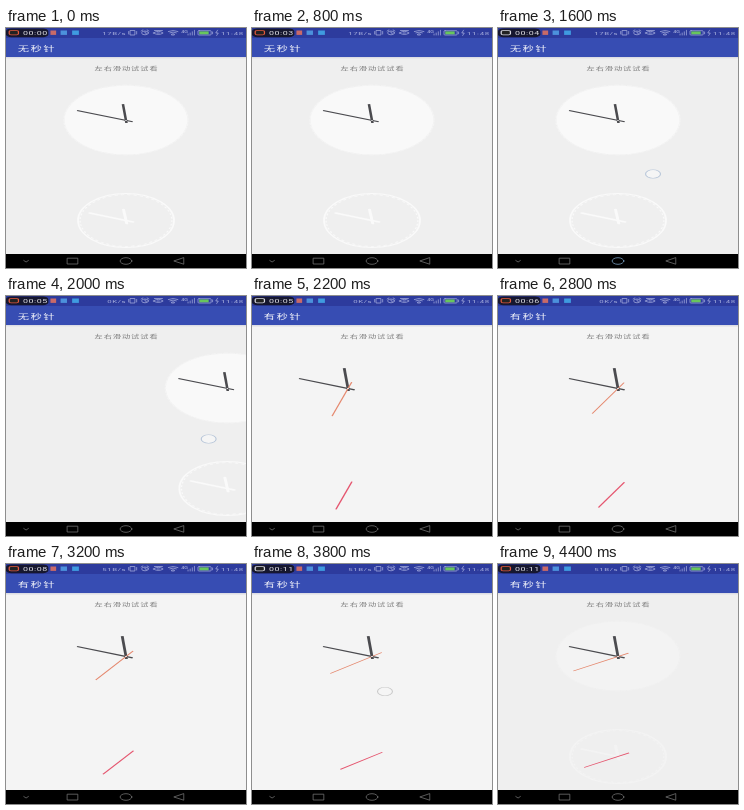
These frames come from a looping animation (240x240 px, 4600 ms). An HTML page:

```html
<!DOCTYPE html>
<html lang="zh">
<head>
<meta charset="utf-8">
<title>Clock pager</title>
<style>
  html, body { margin: 0; width: 100%; height: 100%; overflow: hidden; background: #efefef; }
  svg { display: block; width: 100vw; height: 100vh; }
  text { font-family: Roboto, "Noto Sans CJK SC", "Noto Sans CJK", sans-serif; }
  .line { fill: none; stroke-linecap: round; stroke-linejoin: round; }
  .status { stroke: #aeb6e2; stroke-width: .5; }
  .nav { stroke: #757575; stroke-width: .55; }
  .hands { stroke: #4b4b4f; stroke-linecap: butt; }
  .relief { stroke: #fafafa; }
</style>
</head>
<body>
<!-- A 9:16 phone screen squeezed into the stage -->
<svg viewBox="0 0 135 240" preserveAspectRatio="none">
  <rect id="page" width="135" height="240"/>

  <g id="plain">
    <g id="dials">
      <circle cx="67.5" cy="92" r="34.6" fill="#f9f9f9"/>
      <circle cx="67.5" cy="92" r="34.8" class="line" stroke="#f5f5f5" stroke-width=".8" stroke-dasharray="2 1.6"/>
      <g class="line relief" transform="translate(67.5 192.5)">
        <circle r="27" stroke-width="1"/>
        <circle r="25.8" stroke-width=".7" stroke-dasharray="1.2 2.4"/>
        <path d="M4 1.5 -20.5-7.5" stroke-width="1.4"/>
        <path d="M.4 3-1.4-11" stroke-width="1.7"/>
      </g>
    </g>
    <g id="plainHands" class="hands" transform="translate(67.5 92.5)">
      <path d="M0 2.5V-16.5" transform="rotate(354)" stroke-width="1.45"/>
      <path d="M0 4V-29.3" transform="rotate(290)" stroke-width="1.05"/>
      <circle r=".5" fill="#eee" stroke="none"/>
    </g>
  </g>

  <g id="ticking">
    <g class="hands" transform="translate(67.5 92.5)">
      <path d="M0 2.5V-20.5" transform="rotate(354)" stroke-width="1.6"/>
      <path d="M0 4V-29.3" transform="rotate(290)" stroke-width="1.1"/>
      <path class="second" d="M0 6.8V-29" stroke="#e5886e" stroke-width=".75"/>
      <circle r=".6" fill="#eee" stroke="none"/>
    </g>
    <g transform="translate(67.5 192.5)">
      <path class="second" d="M0 7.2V-22" stroke="#e5566f" stroke-width=".85"/>
    </g>
  </g>

  <text x="67.8" y="42" text-anchor="middle" font-size="4.6" letter-spacing=".55" fill="#777">左右滑动试试看</text>

  <circle id="touch" r="4.2" fill="#f5f5f5" stroke-width=".6"/>

  <rect y="10" width="135" height="19" fill="#374db3"/>
  <rect y="29" width="135" height="1" fill="#dcdde4"/>
  <rect y="30" width="135" height="1" fill="#e8e8eb"/>
  <text id="title" x="6.6" y="23" font-size="6.4" letter-spacing=".8" font-weight="500" fill="#f4f5fb"></text>

  <rect width="135" height="10" fill="#2d3b9d"/>
  <rect y=".4" width="23.8" height="8.8" rx="3" fill="#16172f"/>
  <rect id="record" x="1.8" y="2.6" width="5.2" height="4.2" rx="1" fill="#222" stroke-width=".7"/>
  <text id="timer" x="9.6" y="6.8" font-size="5" letter-spacing=".3" fill="#e6e6ea"></text>
  <rect x="25" y="2.5" width="3.2" height="4.4" fill="#c96a68"/>
  <rect x="30.7" y="2.5" width="3.6" height="4.4" fill="#4c91dc"/>
  <rect x="37.2" y="2.5" width="3.8" height="4.4" fill="#3f9be0"/>
  <text id="rate" x="67.6" y="6.6" text-anchor="end" font-size="4.4" letter-spacing=".35" fill="#a9b1de"></text>
  <g class="line status">
    <path d="M70 2.5H72.5V7H70ZM69 3.5V6M73.5 3.5V6"/>
    <circle cx="78.2" cy="4.9" r="1.9"/>
    <path d="M78.2 3.8V5L79 5.3M76 3 77 2M79.4 2 80.4 3"/>
    <path d="M83 5Q85.7 1.6 88.4 5Q85.7 8 83 5ZM85.2 5H86.2M83.5 2.5H88"/>
    <path d="M91.3 3.5Q94 1.3 96.7 3.5M92.2 4.8Q94 3.3 95.8 4.8M93.3 6Q94 5.5 94.7 6V7H93.3Z"/>
    <path d="M102.4 7V6M103.6 7V5M104.8 7V3.8M106 7V2.3"/>
    <rect x="108" y="2.7" width="7.4" height="4.3" rx=".6"/>
    <path d="M116.2 4V5.8M119 2.2 118 5H119.4L118.5 7.5"/>
  </g>
  <rect x="108.7" y="3.4" width="5.3" height="2.9" fill="#68c65c"/>
  <text x="98.6" y="4.8" font-size="3" fill="#c5cbed">4G</text>
  <text x="121" y="6.6" font-size="4.4" letter-spacing=".35" fill="#a9b1de">11:48</text>

  <rect y="226" width="135" height="14" fill="#000"/>
  <g class="line nav">
    <path d="M10 232.5 11.3 234 12.6 232.5"/>
    <rect x="34.6" y="230.2" width="5.8" height="5.8"/>
    <circle id="home" cx="67.5" cy="233" r="3.3"/>
    <path d="M100 230V236.2L94.6 233.1Z"/>
  </g>
</svg>
<script>
  const LOOP = 4600, STEP = 200, WIDTH = 135;
  const $ = id => document.getElementById(id);
  const secondHands = document.querySelectorAll('.second');

  const timer = [0, 1, 2, 2, 3, 3, 4, 4, 4, 5, 5, 5, 6, 6, 6, 7, 8, 9, 10, 11, 11, 11, 11];
  const seconds = [33, 33, 34, 34, 35, 36, 36, 37, 38, 39, 39, 40, 40]; // from step 10
  const recording = '10101010011001101010101';
  const slide = { 10: -78, 11: -13.5, 12: -2 };
  const touches = { 7: [85.5, 148], 8: [87.2, 146], 9: [91, 145], 10: [114, 143], 19: [74.8, 127.5] };

  const show = (el, on) => el.style.display = on ? '' : 'none';
  const shift = (el, x, y = 0) => el.setAttribute('transform', `translate(${x} ${y})`);

  function draw(step) {
    const ticking = step >= 10, settled = step >= 11;
    const bright = settled && step < 21;
    const offset = slide[step] || 0;

    $('page').setAttribute('fill', bright ? '#f4f4f4' : '#efefef');
    show($('plain'), !bright);
    show($('plainHands'), !settled);
    $('dials').setAttribute('opacity', settled ? .4 : 1);
    shift($('plain'), step === 10 ? offset + WIDTH : 0);

    show($('ticking'), ticking);
    shift($('ticking'), offset);
    if (ticking) secondHands.forEach(hand =>
      hand.setAttribute('transform', `rotate(${seconds[step - 10] * 6})`));

    const touch = touches[step];
    show($('touch'), touch);
    if (touch) {
      shift($('touch'), ...touch);
      $('touch').setAttribute('stroke', settled ? '#c8c8c8' : '#b5c4d8');
    }

    $('title').textContent = settled ? '有秒针' : '无秒针';
    $('timer').textContent = '00:' + String(timer[step]).padStart(2, '0');
    $('rate').textContent = step < 10 ? '17B/s' : step < 16 ? '0K/s' : '51B/s';
    $('record').setAttribute('stroke', recording[step] === '1' ? '#e45a3c' : '#d8d8e0');
    $('home').setAttribute('stroke', step === 8 ? '#7ea3c6' : '#757575');
  }

  const start = performance.now();
  let shown = -1;
  function tick() {
    const step = Math.floor((performance.now() - start) % LOOP / STEP);
    if (step !== shown) draw(shown = step);
    requestAnimationFrame(tick);
  }
  tick();
</script>
</body>
</html>
```
